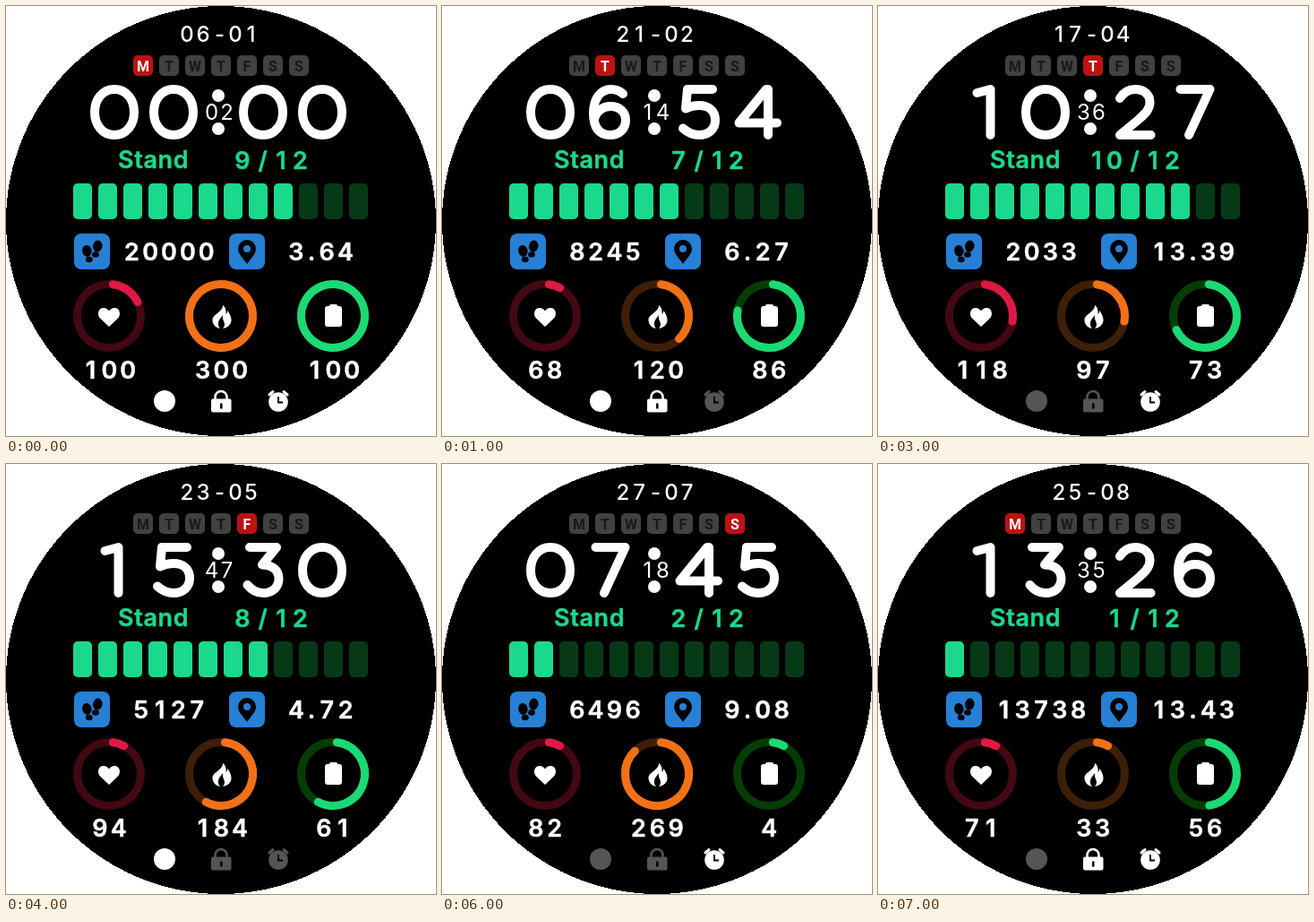
Animation, 480 px wide and 480 px high, one loop 8000 ms. Source, as an HTML page:

```html
<!DOCTYPE html>
<html lang="en">
<head>
<meta charset="utf-8">
<title>Watch face</title>
<style>
  html, body { margin: 0; width: 100%; height: 100%; overflow: hidden; background: #fff; }
  svg { display: block; width: 100vw; height: 100vh; }
  text { font-family: Inter, "Open Sans", sans-serif; fill: #fff; text-anchor: middle; }
  .value { font-size: 27px; font-weight: 600; stroke: #fff; stroke-width: .5; stroke-linejoin: round; }
  .light { font-size: 24px; font-weight: 500; }
  #sec { font-weight: 400; }
  .green { fill: #1bd98c; stroke: #1bd98c; }
  .label { text-anchor: start; letter-spacing: .6px; }
  #days rect { fill: #414141; }
  #days text { font: 700 16px Roboto, sans-serif; fill: #191919; }
  #days .on rect { fill: #bc1212; }
  #days .on text { fill: #fff; }
  #bars rect { fill: #063a17; }
  #bars .on { fill: #1bd98c; }
  #clock path { fill: none; stroke: #fff; stroke-width: 10; stroke-linecap: round; stroke-linejoin: round; }
  #rings path, #rings circle { fill: none; stroke-width: 9; stroke-linecap: round; }
  #status g { color: #555; fill: currentColor; stroke: currentColor; stroke-width: 0; }
  #status .on { color: #fff; }
</style>
</head>
<body>
<svg viewBox="0 0 480 480">
  <circle cx="240" cy="240" r="240" shape-rendering="crispEdges"/>
  <text id="date" class="light" y="40"/>
  <g id="days"/>
  <g id="clock" role="img"/>
  <g fill="#fff"><circle cx="237" cy="100" r="7"/><circle cx="237" cy="137" r="7"/></g>
  <text id="sec" class="light" y="127"/>

  <text class="value green label" x="125" y="181">Stand</text>
  <text id="stand" class="value green" y="182"/>
  <g id="bars"/>

  <g fill="#2680d5">
    <rect x="76" y="254" width="40" height="40" rx="8"/>
    <rect x="249" y="254" width="40" height="40" rx="8"/>
  </g>
  <ellipse cx="90.300" cy="273.500" rx="5.200" ry="6.500" transform="rotate(-10 90 273)"/>
  <ellipse cx="92.800" cy="283" rx="3.900" ry="3.200"/>
  <ellipse cx="102.300" cy="268" rx="5.200" ry="6.500" transform="rotate(10 102 268)"/>
  <ellipse cx="100" cy="277.500" rx="3.900" ry="3.200"/>
  <path d="M269 288C265 282 259 277 259 271a10 10 0 0 1 20 0C279 277 273 282 269 288Z"/>
  <circle cx="269" cy="271" r="4" fill="#2680d5"/>
  <text id="steps" class="value" y="284"/>
  <text id="dist" class="value" y="284"/>

  <g id="rings"/>
  <g fill="#fff">
    <path d="M115 358L105 348.500C101.500 345 102.500 337 109 337Q113 337 115 340.500Q117 337 121 337C127.500 337 128.500 345 125 348.500Z"/>
    <path d="M242 334C242 342 230 344 230.500 351C231 356 234 359 239 360C235 355 237 351 242 345C241 350 244 352 244 355C244 357 243 359 242 360C248 359 252 355 251.500 350C251 345 249 343 247.500 340C247 342 246.500 343 245.500 344C246 340 245 336 242 334Z"/>
    <rect x="356" y="335" width="19" height="23" rx="3"/>
    <rect x="361" y="333" width="9" height="5" rx="1.500"/>
  </g>
  <text id="heart" class="value" y="416"/>
  <text id="cal" class="value" y="416"/>
  <text id="bat" class="value" y="416"/>

  <g id="status">
    <g><circle cx="177" cy="441" r="12"/></g>
    <g>
      <rect x="229" y="438.500" width="22.500" height="15" rx="2"/>
      <path d="M233.500 439v-2.500a6.500 6.500 0 0 1 13 0V439" fill="none" stroke-width="2.500"/>
      <path d="M240.300 444.500v4" stroke="#000" stroke-width="2.500" stroke-linecap="round"/>
    </g>
    <g>
      <circle cx="304" cy="442" r="10.800"/>
      <path d="M294 434l4-3.500M314 434l-4-3.500" stroke-width="3" stroke-linecap="round"/>
      <path d="M304 436v6.500h5" fill="none" stroke="#000" stroke-width="2"/>
    </g>
  </g>
</svg>
<script>
const $ = id => document.getElementById(id);
const times = (n, fn) => Array.from({ length: n }, (_, i) => fn(i)).join('');

// Centre lines of the clock numerals, around (0, 0)
const SIX = 'M15-20.5C11-24 7-25.5 2-25.5C-11-25.5-18-14-18 1C-18 17-12 25.5 .5 25.5C11 25.5 18 18.5 18 9C18-.5 11-6.5 1-6.5C-8-6.5-16 0-17 8';
const NUMERALS = {
  0: 'M0-25.5C13.5-25.5 22-14 22 0S13.5 25.500 0 25.500-22 14-22 0-13.5-25.500 0-25.500Z',
  1: 'M-10.5-21.500L4.500-25.500V25.500',
  2: 'M-17-15.500C-13-22-8-25.500 0-25.500C10-25.500 16.500-19.500 16.500-11C16.500-3 11 2 3 9L-17 25.500H17.500',
  3: 'M-15-25.500H15L-1-6C11-5.500 17.500 0 17.500 9.500C17.500 19 10.500 25.500 0 25.500C-8 25.500-13 22-17.500 16.500',
  4: 'M11 25.500V-25.500H9L-21.500 12H21',
  5: 'M15-25.500H-13L-15-4C-10-6.500-5-7.500 0-7.500C11-7.500 18-1 18 9C18 19 10.500 25.500 0 25.500C-8 25.500-13 22.500-18 18',
  6: SIX,
  7: 'M-15.500-25.500H17.500L-6 25.500',
  9: SIX
};

// Each ring value is [reading, tenths lit]
const keys = ['date', 'day', 'clock', 'sec', 'stand', 'steps', 'dist', 'heart', 'cal', 'bat', 'status'];
const states = [
  ['06-01', 0, '0000', '02', 9, '20000', '3.64', [100, 2], [300, 10], [100, 10], '111'],
  ['21-02', 1, '0654', '14', 7, '8245', '6.27', [68, 1], [120, 4], [86, 8], '110'],
  ['12-03', 2, '0935', '22', 1, '13792', '3.50', [52, 1], [156, 5], [95, 9], '111'],
  ['17-04', 3, '1027', '36', 10, '2033', '13.39', [118, 3], [97, 3], [73, 7], '001'],
  ['23-05', 4, '1530', '47', 8, '5127', '4.72', [94, 1], [184, 6], [61, 6], '100'],
  ['14-06', 5, '0009', '03', 5, '6081', '9.35', [106, 2], [239, 8], [98, 9], '010'],
  ['27-07', 6, '0745', '18', 2, '6496', '9.08', [82, 1], [269, 9], [4, 1], '001'],
  ['25-08', 0, '1326', '35', 1, '13738', '13.43', [71, 1], [33, 1], [56, 5], '011']
].map(row => Object.fromEntries(keys.map((k, i) => [k, row[i]])));

const rings = [
  ['heart', 115, '#420813', '#de1a44'],
  ['cal', 240, '#3d1f07', '#f27117'],
  ['bat', 365, '#053d05', '#1bd974']
];

$('days').innerHTML = times(7, i => `<g><rect x="${142 + 29 * i}" y="55" width="22" height="23" rx="5"/>
  <text x="${153 + 29 * i}" y="72.500">${'MTWTFSS'[i]}</text></g>`);
$('bars').innerHTML = times(12, i => `<rect x="${75 + 28 * i}" y="198" width="21" height="40" rx="5"/>`);
$('rings').innerHTML = rings.map(([id, x, track, lit]) =>
  `<circle cx="${x}" cy="346" r="35.500" stroke="${track}"/><path id="${id}Arc" stroke="${lit}"/>`).join('');

function put(id, str, xs) {
  $(id).setAttribute('x', xs.join(' '));
  $(id).textContent = str;
}

// Evenly pitched characters around cx, with a narrower point
function putCentred(id, value, cx, pitch = 20.8) {
  const str = String(value);
  const widths = [...str].map(c => c === '.' ? 13.5 : pitch);
  let x = cx - widths.reduce((a, b) => a + b) / 2;
  put(id, str, widths.map(w => (x += w) - w / 2));
}

function arc(cx, level) {
  const at = deg => {
    const a = deg * Math.PI / 180;
    return `${cx + 35.5 * Math.sin(a)} ${346 - 35.5 * Math.cos(a)}`;
  };
  const end = level === 10 ? 366 : 36 * level - 8;
  return `M${at(7)}A35.500 35.500 0 ${end > 187 ? 1 : 0} 1 ${at(end)}`;
}

function mark(id, test) {
  [...$(id).children].forEach((el, i) => el.classList.toggle('on', test(i)));
}

function show(s) {
  put('date', s.date, [202, 220, 238.5, 256, 273.5]);
  mark('days', i => i === s.day);
  $('clock').setAttribute('aria-label', s.clock.slice(0, 2) + ':' + s.clock.slice(2));
  $('clock').innerHTML = [...s.clock].map((c, i) =>
    `<path transform="translate(${[121, 187, 287, 353][i]} 118.500)${c === '9' ? ' rotate(180)' : ''}" d="${NUMERALS[c]}"/>`).join('');
  put('sec', s.sec, [229.5, 246.5]);
  put('stand', s.stand + '/12', [244, 264, 286.5, 307, 328.5].slice(s.stand < 10 ? 1 : 0));
  mark('bars', i => i < s.stand);
  putCentred('steps', s.steps, 182);
  putCentred('dist', s.dist, 351.5);
  for (const [id, x] of rings) {
    putCentred(id, s[id][0], x + .3);
    $(id + 'Arc').setAttribute('d', arc(x, s[id][1]));
  }
  mark('status', i => s.status[i] === '1');
}

let shown = -1;
function tick() {
  const i = Math.floor(performance.now() / 1000) % states.length;
  if (i !== shown) show(states[shown = i]);
  requestAnimationFrame(tick);
}
tick();
</script>
</body>
</html>
```
